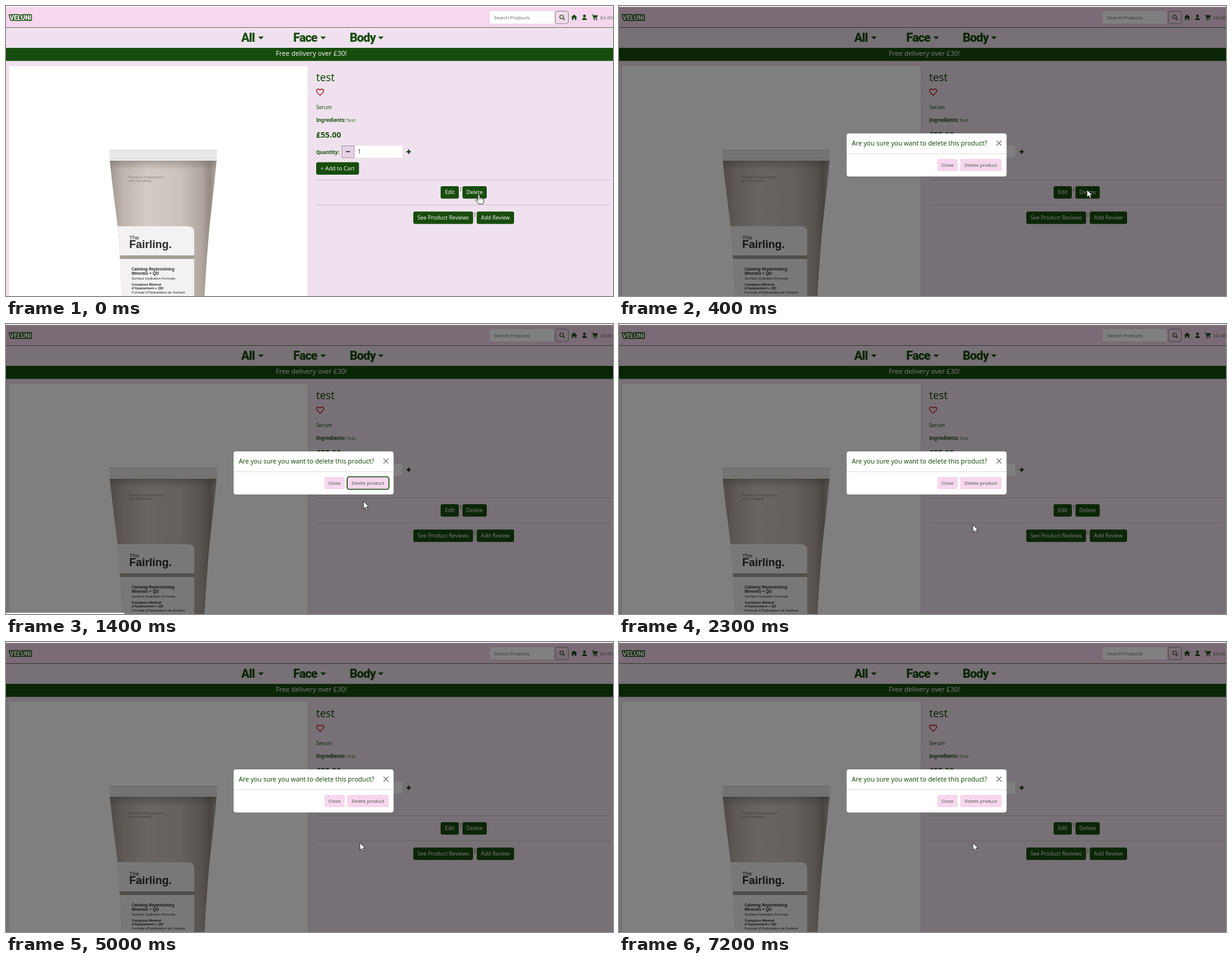
These frames come from a looping animation (1000 px wide and 478 px high, 7300 ms). An HTML page:

```html
<!DOCTYPE html>
<html lang="en">
<head>
<meta charset="utf-8">
<title>Delete product</title>
<style>
  html, body { margin: 0; width: 100%; height: 100%; overflow: hidden; background: #efe2ee; }
  svg { display: block; width: 1000px; height: 478px; }
  text { font-family: "Noto Sans", "Open Sans", sans-serif; white-space: pre; }
  .nav { font-family: Roboto, "Open Sans", sans-serif; font-stretch: 75%; font-weight: 900; letter-spacing: -0.8px; }
  .brand { font-family: Roboto, "Open Sans", sans-serif; font-stretch: 75%; font-weight: 900; paint-order: stroke; stroke: #174d0c; stroke-width: 3px; stroke-linejoin: round; }
  .pack { font-family: "Liberation Sans", Arial, sans-serif; }
</style>
</head>
<body>
<svg id="stage" viewBox="0 0 1000 478" xmlns="http://www.w3.org/2000/svg">
  <defs>
    <linearGradient id="tube" x1="0" x2="1" y1="0" y2="0">
      <stop offset="0" stop-color="#a0978f"/>
      <stop offset=".12" stop-color="#bdb4ad"/>
      <stop offset=".35" stop-color="#d3cbc5"/>
      <stop offset=".65" stop-color="#cbc3bc"/>
      <stop offset=".86" stop-color="#b0a69f"/>
      <stop offset=".94" stop-color="#948a83"/>
      <stop offset="1" stop-color="#b5aca6"/>
    </linearGradient>
    <linearGradient id="fold" x1="0" x2="0" y1="0" y2="1">
      <stop offset="0" stop-color="#6f655f" stop-opacity=".45"/>
      <stop offset="1" stop-color="#6f655f" stop-opacity="0"/>
    </linearGradient>
    <clipPath id="body"><path d="M171 254H347C343 300 336 350 333 390Q329 440 327 478H191Q189 430 186 385C182 340 175 300 171 254Z"/></clipPath>
  </defs>
  <g id="page"></g>
  <g id="hover"></g>
  <g id="dialog"></g>
  <rect id="status" y="476" width="195" height="2" fill="#fff"/>
  <g id="arrow"><path d="M0 0V12.2L2.9 9.6L5 14.3L7 13.4L5 8.8H8.8Z" fill="#fff" stroke="#222" stroke-width=".9" stroke-linejoin="round"/></g>
  <g id="hand"><path d="M-1.4 1.2Q0-.8 1.4 1.2V5.6Q2.6 4.6 3.8 6Q5 5.2 6 6.6Q8 6 8.2 8V11.5Q8 14 6.6 16H-.6Q-2 13.5-4.6 10.2Q-4.8 8-2.8 8.8L-1.4 10Z" fill="#fff" stroke="#222" stroke-width=".9" stroke-linejoin="round"/><path d="M1.4 5.6V8.6M3.8 6V8.8M6 6.6V9" fill="none" stroke="#222" stroke-width=".7"/></g>
</svg>
<script>
const LOOP = 7300, STEP = 100;
const GREEN = '#174d0c', BG = '#efe2ee', PINK = '#f6d7ee';
const $ = id => document.getElementById(id);

const rect = (x, y, w, h, fill, r = 0, extra = '') =>
  `<rect x="${x}" y="${y}" width="${w}" height="${h}" rx="${r}" fill="${fill}" ${extra}/>`;
const path = (d, fill, extra = '') => `<path d="${d}" fill="${fill}" ${extra}/>`;
const line = (d, color, w, extra = '') => path(d, 'none', `stroke="${color}" stroke-width="${w}" ${extra}`);
const text = (x, y, size, str, fill = GREEN, extra = '') =>
  `<text x="${x}" y="${y}" font-size="${size}" fill="${fill}" ${extra}>${str}</text>`;
const MID = 'text-anchor="middle"', BOLD = 'font-weight="700"', PACK = 'class="pack"';
const button = (x, y, w, label, size = 8.8) =>
  rect(x, y, w, 20.5, GREEN, 3) + text(x + w / 2, y + 13.3, size, label, '#f7eef5', MID);

function header() {
  const menu = [['All', 398.5, 420], ['Face', 493, 522.5], ['Body', 587.5, 617.5]];
  return rect(0, 0, 1000, 478, BG) + rect(0, 0, 1000, 2, '#fff') + rect(0, 1.5, 1000, 33.5, PINK) +
    rect(0, 35, 1000, 1, '#6c7369') +
    text(24, 22.6, 10.5, 'VELUNI', '#fff', MID + ' class="brand"') +
    rect(797, 8.5, 106, 20.5, '#fff', 3) + text(804, 21.5, 7.75, 'Search Products', '#666d66') +
    rect(905, 8.5, 21.5, 20.5, PINK, 3, 'stroke="#82907e"') +
    line('M918 20.5L920.5 23', GREEN, 1.4) +
    `<circle cx="915.4" cy="18" r="3" fill="none" stroke="${GREEN}" stroke-width="1.2"/>` +
    path('M931 18.6L936 14L941 18.6H939.6V23H937.2V20H934.8V23H932.4V18.6Z', GREEN) +
    `<circle cx="953" cy="16.4" r="2.3" fill="${GREEN}"/>` +
    path('M949 23Q949 19.4 953 19.4T957 23Z', GREEN) +
    path('M965 14H967L967.4 15.2H975L973.6 19.6H968.4L968.7 20.6H973.6V21.4H968L966.4 15H965Z', GREEN) +
    `<circle cx="969" cy="22.6" r="1" fill="${GREEN}"/><circle cx="973" cy="22.6" r="1" fill="${GREEN}"/>` +
    text(979, 21.6, 7.9, '£0.00', '#5d6b59') +
    menu.map(([word, x, caret]) => text(x, 59, 20, word, GREEN, MID + ' class="nav"') +
      path(`M${caret - 4.7} 50.3h9.4l-4.7 4.7z`, GREEN)).join('') +
    rect(0, 69, 1000, 21.5, GREEN) +
    text(503, 81.5, 11.1, 'Free delivery over £30!', '#f4edf3', MID);
}

function photo() {
  const dark = '#2b2929';
  return rect(5, 99, 491.5, 379, '#fff') +
    '<g clip-path="url(#body)">' + rect(171, 254, 176, 224, 'url(#tube)') +
    rect(171, 254, 176, 16, 'url(#fold)') +
    path('M180 363H300Q310 363 310 373V411H180Z', '#f3f1f2') +
    rect(180, 411, 130, 6, '#a69e98') + rect(180, 417, 130, 61, '#f3f1f2') + '</g>' +
    path('M170 237H347.5V255H171Z', '#e9e9e9') + rect(170, 237, 177.5, 2, '#dcdcdc') +
    rect(171, 250, 176, 1, '#d9d9d9') +
    text(202, 283.6, 6, 'Practical Preparations', '#88807b', PACK) +
    text(202, 290.4, 6, 'with Simplicity.', '#88807b', PACK) +
    text(203, 384.5, 9.4, 'The', dark, PACK) +
    text(203, 398.5, 18, 'Fairling.', dark, BOLD + ' ' + PACK) +
    text(207, 435.5, 6.7, 'Calming Replenishing', dark, BOLD + ' ' + PACK) +
    text(207, 443, 6.7, 'Minerals + QD', dark, BOLD + ' ' + PACK) +
    text(207, 450.5, 6, 'Surface Hydration Formula', dark, PACK) +
    text(207, 460.5, 5.7, 'Complexe Minéral', dark, BOLD + ' ' + PACK) +
    text(207, 467, 5.7, 'd’Apaisement + QD', dark, BOLD + ' ' + PACK) +
    text(207, 474, 5.9, 'Formule d’Hydratation de Surface', dark, PACK);
}

function details() {
  return text(511, 123.5, 17.3, 'test', GREEN, 'font-weight="500"') +
    line('M517.5 147.3L512.6 142.4Q510.6 139.6 512.5 137.5Q515 135.6 517.5 138.7Q520 135.6 522.5 137.5Q524.4 139.6 522.4 142.4Z', '#b5182c', 1.3, 'stroke-linejoin="round"') +
    text(511, 169.8, 8.4, 'Serum') +
    text(511, 191, 8, 'Ingredients:', GREEN, BOLD) + text(561, 191, 7.8, 'Test', '#3d6535') +
    text(511, 217.3, 13, '£55.00', GREEN, BOLD) +
    text(511, 243.5, 8, 'Quantity:', GREEN, BOLD) +
    rect(574, 230.5, 79, 19.5, '#fff', 2) +
    rect(553.5, 230.5, 20, 19.5, '#e6d3e6', 0, 'stroke="#a797a7"') +
    rect(560, 239.2, 7, 1.8, '#4a3a5a') + text(580, 243.4, 8, '1', '#222') +
    line('M659.8 240.2H667M663.4 236.6V243.8', '#12300c', 2) +
    button(511, 257.5, 70.5, '+ Add to Cart', 9.1) +
    rect(511, 286, 485, 1, '#cfc3cd') + rect(511, 327.5, 485, 1, '#cfc3cd') +
    button(716, 297, 30, 'Edit') + button(752, 297, 40, 'Delete') +
    button(671, 338.7, 98.5, 'See Product Reviews') + button(775.5, 338.7, 61.5, 'Add Review') +
    rect(748.5, 298, 1, 8, '#65785f') + rect(772, 340, 1, 8, '#65785f');
}

function dialog() {
  return rect(0, 1.5, 1000, 476.5, '#000', 0, 'opacity=".5"') +
    rect(375, 210, 263.5, 71, '#fff', 4) + rect(375, 243, 263.5, 1, '#dcdcdf') +
    text(383.5, 230, 10.5, 'Are you sure you want to delete this product?', GREEN, 'font-weight="500"') +
    line('M622 222L630 230M630 222L622 230', '#777', 1.3) +
    rect(524.5, 252, 33.5, 20.3, PINK, 3) + text(541.2, 265.2, 7.9, 'Close', '#4b5848', MID) +
    rect(562, 252, 68.5, 20.3, PINK, 3) + text(596.2, 265.2, 7.7, 'Delete product', '#4b5848', MID) +
    rect(562, 251.7, 68.8, 20.8, 'none', 3.5, `id="ring" stroke="${GREEN}" stroke-width="1.6"`);
}

$('page').innerHTML = header() + photo() + details();
$('hover').innerHTML = rect(752, 296.5, 41, 21.5, BG, 4, `stroke="${GREEN}" stroke-width="2"`) +
  text(772, 310.3, 8.8, 'Delete', GREEN, MID);
$('dialog').innerHTML = dialog();

// time, x, y of the pointer tip
const TRACK = [[0, 779, 310.5], [300, 776, 303.5], [400, 771, 303], [600, 738, 297], [900, 634, 275],
  [1100, 598, 265], [1300, 596, 265], [1400, 589, 292.3], [1600, 584, 326], [1800, 583, 331]];

function pointer(t) {
  const i = TRACK.findIndex(k => k[0] > t);
  if (i < 0) return TRACK[TRACK.length - 1].slice(1);
  const [t0, x0, y0] = TRACK[i - 1], [t1, x1, y1] = TRACK[i];
  const p = (t - t0) / (t1 - t0);
  return [x0 + (x1 - x0) * p, y0 + (y1 - y0) * p];
}

const show = (id, on) => $(id).setAttribute('visibility', on ? 'visible' : 'hidden');

function draw(ms) {
  const t = Math.floor((ms % LOOP) / STEP) * STEP;
  const open = t >= 400;
  const overConfirm = t >= 1000 && t < 1400;
  const hand = !open || overConfirm;
  const [x, y] = pointer(t);
  show('hover', t >= 100 && !open);
  show('dialog', open);
  show('ring', t >= 1000 && t < 1500);
  show('status', t >= 1000 && t < 1600);
  show('hand', hand);
  show('arrow', !hand);
  $(hand ? 'hand' : 'arrow').setAttribute('transform', `translate(${x} ${y})`);
}

const start = performance.now();
function tick() {
  draw(performance.now() - start);
  requestAnimationFrame(tick);
}
tick();
</script>
</body>
</html>
```
